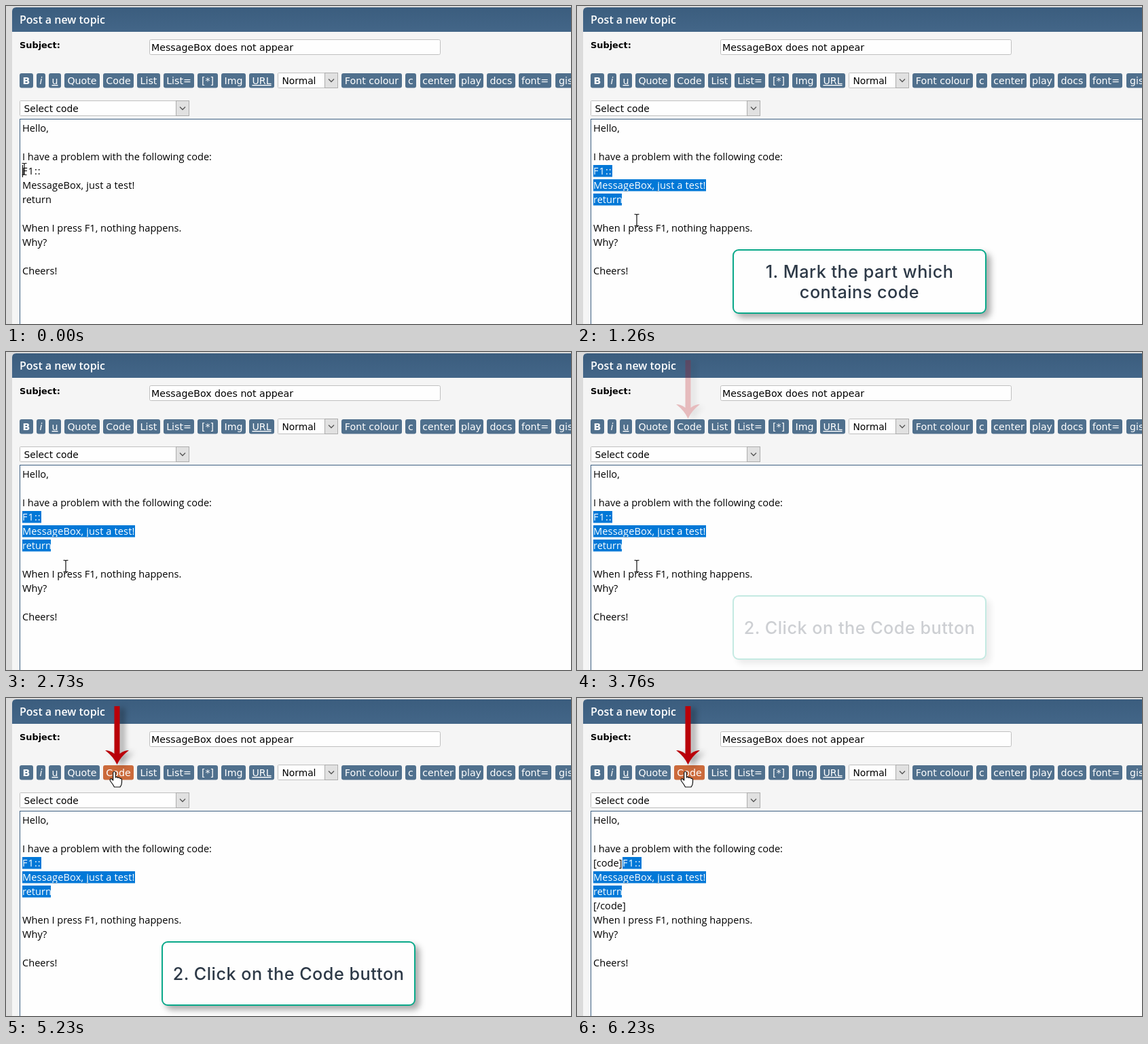
Recreate the animation shown at these times as an HTML page. Size 832 px wide and 468 px high, loop 7930 ms.

```html
<!DOCTYPE html>
<html lang="en">
<head>
<meta charset="utf-8">
<title>Post a new topic</title>
<style>
html, body { margin: 0; width: 100%; height: 100%; overflow: hidden; background: #dbdbdb; }
svg { display: block; width: 832px; height: 468px; font: 14.2px "DejaVu Sans", Verdana, sans-serif; }
text { white-space: pre; }
#lines, #linesSel, .title { font-family: "Open Sans", sans-serif; font-size: 14.6px; }
.title { font-size: 16px; font-weight: 600; fill: #fff; }
.field { fill: #fefefe; stroke: #c0c0c0; }
.callout { filter: drop-shadow(6px 6px 5px #0005); }
.callout rect { fill: #fefefe; stroke: #0aa98a; stroke-width: 2; }
.callout text { font: 500 25.2px Inter, sans-serif; letter-spacing: .5px; fill: #2d3947; text-anchor: middle; }
#arrow { fill: #b90009; filter: drop-shadow(7px 3px 4px #0005); }
.pointer { fill: #fff; stroke: #111; stroke-width: 1.2; stroke-linejoin: round; }
</style>
</head>
<body>
<svg viewBox="0 0 832 468">
  <defs>
    <linearGradient id="head" x2="0" y2="1">
      <stop stop-color="#3b5d7e"/><stop offset="1" stop-color="#436688"/>
    </linearGradient>
    <clipPath id="sel"><rect/><rect/><rect/></clipPath>
  </defs>
  <path d="M9 468V8Q9 2 15 2H832V468Z" fill="#f5f5f5"/>
  <path d="M9 38V8Q9 2 15 2H832V38Z" fill="url(#head)"/>
  <text class="title" x="20" y="26">Post a new topic</text>
  <text x="20" y="62" font-size="12.9" font-weight="bold">Subject:</text>
  <rect class="field" x="211.5" y="49.5" width="428" height="22" rx="2"/>
  <text x="214" y="66">MessageBox does not appear</text>
  <g id="bar"></g>
  <rect x="20.5" y="166.5" width="830" height="320" fill="#fefefe" stroke="#3d6082"/>
  <g id="lines"></g>
  <g clip-path="url(#sel)">
    <rect x="20" y="230" width="400" height="70" fill="#0078d7"/>
    <g id="linesSel" fill="#fff"></g>
  </g>
  <path id="caret" d="M24.5 234V252" stroke="#000"/>
  <g class="callout" id="mark">
    <rect x="230" y="359" width="372" height="93" rx="8"/>
    <text x="416" y="400">1. Mark the part which</text>
    <text x="416" y="430">contains code</text>
  </g>
  <g class="callout" id="click">
    <rect x="230" y="359" width="372" height="93" rx="8"/>
    <text x="416" y="415">2. Click on the Code button</text>
  </g>
  <path id="arrow" d="M159.5 12H167.5V82Q174 77 181 77Q169 86 163.5 98Q158 86 146 77Q153 77 159.5 82Z"/>
  <g id="mouse">
    <path id="beam" d="M-3.5-8.5H-1L0-7.5L1-8.5H3.5M0-7.5V7.5M-3.5 8.5H-1L0 7.5L1 8.5H3.5" fill="none" stroke="#111" stroke-width="1.2"/>
    <path id="pointer" class="pointer" d="M0 0V16L4 12.5L6.5 18L9 17L6.5 11.5H11.5Z"/>
    <path id="hand" class="pointer" d="M-1.8 1.5Q0-1 1.8 1.5V9Q4 7 5 9.5Q7.5 8 8.5 10.5Q11 10 11 12.5V16Q11 20 8.5 23H0Q-2 19-6 14Q-7 10.5-4 11L-1.8 13Z"/>
  </g>
</svg>
<script>
const $ = id => document.getElementById(id);
const clamp = v => Math.min(1, Math.max(0, v));
const ramp = (t, from, to) => clamp((t - from) / (to - from));
const ease = p => p * p * (3 - 2 * p);
const mix = (a, b, p) => a + (b - a) * p;

// Toolbar: label, left, right, extra text attributes
const buttons = [
  ["B", 20, 40, 'font-weight="bold"'], ["i", 45, 58, 'font-style="italic"'],
  ["u", 63, 81, 'text-decoration="underline"'], ["Quote", 86, 138], ["Code", 143, 188],
  ["List", 193, 227], ["List=", 232, 277], ["[*]", 282, 312], ["Img", 317, 353],
  ["URL", 358, 395, 'text-decoration="underline"'], ["Font colour", 494, 583],
  ["c", 588, 604], ["center", 610, 662], ["play", 667, 703], ["docs", 708, 750],
  ["font=", 755, 803], ["gist", 809, 845]
];
const button = ([label, l, r, attrs = ""]) =>
  `<rect id="btn${label}" x="${l}" y="99" width="${r - l}" height="21.5" rx="3" fill="#50708d"/>
   <text x="${(l + r) / 2}" y="115" text-anchor="middle" fill="#fff" ${attrs}>${label}</text>`;

const select = (id, label, x, y, w) =>
  `<rect id="${id}" class="field" x="${x + .5}" y="${y + .5}" width="${w - 1}" height="22" rx="1"/>
   <text x="${x + 6.5}" y="${y + 17}" font-size="13.8">${label}</text>
   <rect x="${x + w - 19.5}" y="${y + .5}" width="19" height="22" fill="#e1e1e1" stroke="#adadad"/>
   <path d="M${x + w - 14} ${y + 9.5}l4 4l4-4" fill="none" stroke="#555" stroke-width="1.3"/>`;

$("bar").innerHTML = buttons.map(button).join("") +
  select("size", "Normal", 400, 98, 89) + select("lang", "Select code", 20, 139, 250);

const row = (n, s, extra = "") => `<text x="24" y="${185 + 21 * n}" ${extra}>${s}</text>`;
const codeRows = row(3, "F1::", 'class="first" letter-spacing="1"') +
  row(4, "MessageBox, just a test!", 'letter-spacing=".13"') + row(5, "return");
$("lines").innerHTML = row(0, "Hello,") + row(2, "I have a problem with the following code:") +
  codeRows + row(7, "When I press F1, nothing happens.") + row(8, "Why?") + row(10, "Cheers!") +
  `<g id="tags">${row(3, "[code]")}${row(6, "[/code]")}</g>`;
$("linesSel").innerHTML = codeRows;

const show = (id, on) => $(id).style.display = on ? "" : "none";
const selRects = document.querySelectorAll("#sel rect");
const firsts = document.querySelectorAll(".first");
const rowWidths = [28, 166, 42];

function mouseAt(t) {
  const drag = ease(ramp(t, 880, 1260));
  const go = ease(ramp(t, 4400, 5100)), settle = ramp(t, 5100, 5230);
  return [
    mix(mix(mix(27, 88, drag), 165, go), 159.5, settle),
    mix(mix(mix(240, 315, drag), 109.5, go), 108, settle)
  ];
}

function draw(t) {
  const [x, y] = mouseAt(t);
  const inserted = t >= 5900;
  const left = inserted ? 67 : 24;

  // Selection follows the mouse until every code row is covered
  const current = t < 1260 ? Math.floor((y - 232) / 21) : 3;
  selRects.forEach((r, i) => {
    const w = t < 880 || i > current ? 0 : i < current ? rowWidths[i] : Math.min(rowWidths[i], x - 24);
    r.setAttribute("x", i ? 24 : left);
    r.setAttribute("y", 234 + 21 * i);
    r.setAttribute("width", w);
    r.setAttribute("height", 17.5);
  });
  firsts.forEach(e => e.setAttribute("x", left));
  show("tags", inserted);
  show("caret", t < 500);

  $("mark").style.opacity = t < 100 ? 0 : ramp(t, 0, 1000) * (1 - ramp(t, 2330, 2730));
  const second = ramp(t, 3530, 4530);
  $("click").style.opacity = second * (1 - ramp(t, 5800, 6230));
  $("arrow").style.opacity = second;

  const onButton = y < 120.5 && x > 143 && x < 188;
  $("btnCode").setAttribute("fill", onButton ? "#cb6a3b" : "#50708d");
  $("lang").style.stroke = y > 139 && y < 162 ? "#8a8a8a" : "";
  show("beam", y > 166);
  show("pointer", y <= 166 && !onButton);
  show("hand", onButton);
  $("mouse").setAttribute("transform", `translate(${x} ${y})`);
}

const start = performance.now();
function tick() {
  draw((performance.now() - start) % 7930);
  requestAnimationFrame(tick);
}
tick();
</script>
</body>
</html>
```
